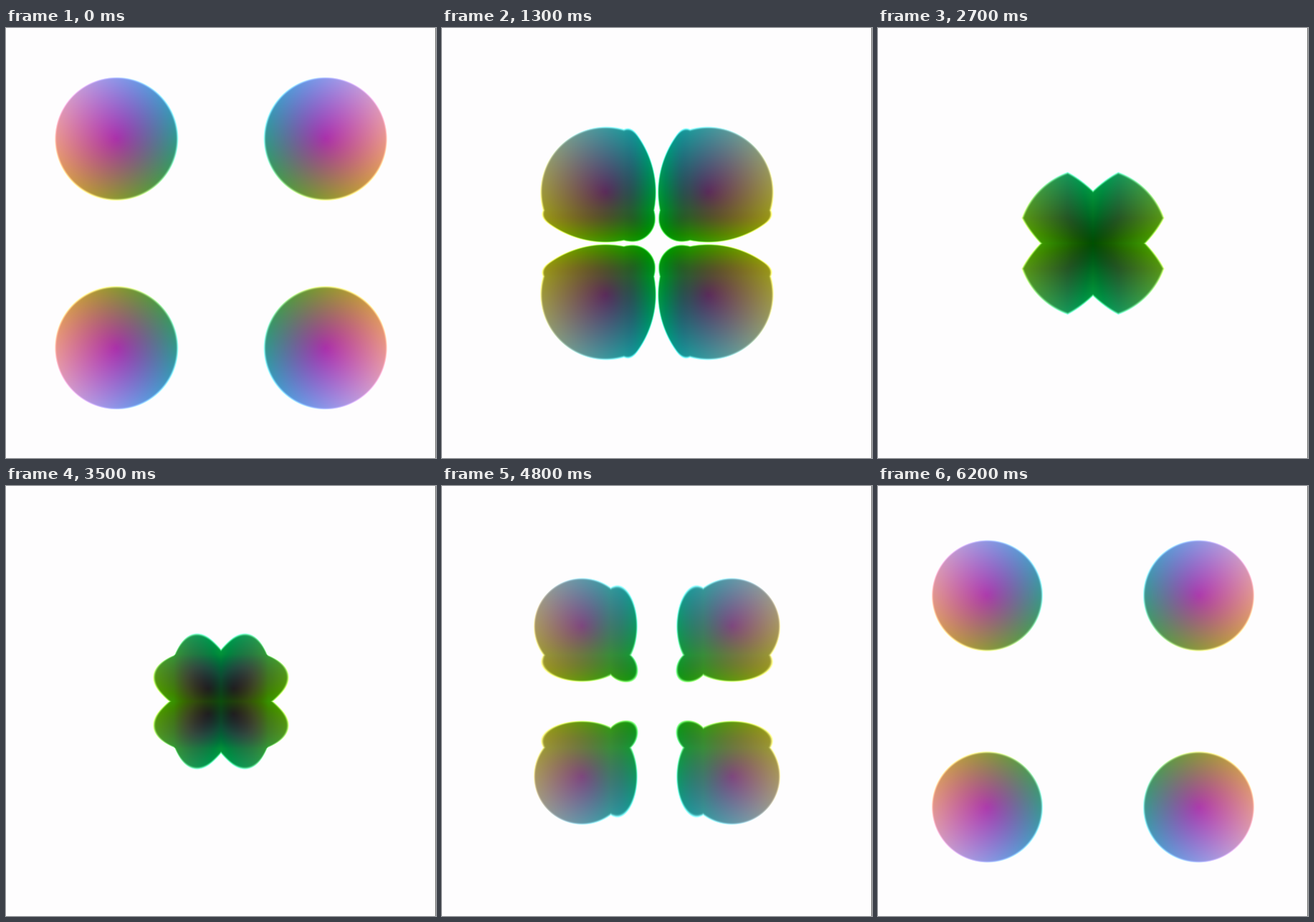
Recreate the animation shown at these times as an HTML page with a canvas. Size 600x600 px, loop 6300 ms.

```html
<!DOCTYPE html>
<html lang="en">
<head>
<meta charset="utf-8">
<title>Pulsing orbs</title>
<style>
  html, body { margin: 0; width: 100%; height: 100%; overflow: hidden; background: #fefdfe; }
  canvas { display: block; width: 100vw; height: 100vh; }
</style>
</head>
<body>
<canvas id="stage" width="600" height="600"></canvas>
<script>
const SIZE = 600, STEP = 100, STEPS = 63;
const CX = 299.5, CY = 300;
const BAND = 35.5; // half width of the creases along both axes

const ctx = document.getElementById('stage').getContext('2d');
const image = ctx.createImageData(SIZE, SIZE);
const data = image.data;

// max(0, x) with its corner rounded over a width of 2w
function softRamp(x, w) {
  if (x <= -w) return 0;
  return x < w ? (x + w) ** 2 / (4 * w) : x;
}

function render(t) {
  const offset = 75.5 + 74.5 * Math.cos(t + 0.32);
  const radius = 85.8 + 21 * Math.sin(5 * t);
  const slack = Math.max(0, 104 - radius);
  const reach = BAND + 0.78 * slack;
  const pull = 0.175 * Math.sqrt(slack);
  const soft = 0.6 * slack + 0.01;

  const crease = a => softRamp(BAND - a, soft);
  const bulge = a => {
    const depth = Math.max(0, reach - a);
    return pull * depth / (1 + depth / 40);
  };

  for (let y = 0, i = 0; y < SIZE; y++) {
    const v = Math.abs(y - CY);
    const creaseV = crease(v), bulgeV = bulge(v);
    for (let x = 0; x < SIZE; x++, i += 4) {
      const u = Math.abs(x - CX);
      const bulgeU = bulge(u);
      const d = Math.hypot(u - offset, v - offset)
        + Math.hypot(crease(u), creaseV)
        - bulgeU - bulgeV - bulgeU * bulgeV / 40;
      const rim = Math.min(1, Math.max(0, (d - radius + 3.2) / 5));
      const glow = 255 * rim * rim;
      const tint = 12 - 30 * Math.min(1, Math.max(0, d / radius));
      data[i] = Math.min(254, Math.max(0, 1.08 * u + tint) + glow);
      data[i + 1] = Math.min(253, Math.max(0, 152 - 1.2 * (radius - d)) + glow);
      data[i + 2] = Math.min(254, Math.max(0, 1.08 * v + tint) + glow);
      data[i + 3] = 255;
    }
  }
  ctx.putImageData(image, 0, 0);
  ctx.fillStyle = '#6b6b6b';
  ctx.fillRect(SIZE - 1, 0, 1, SIZE);
}

const start = performance.now();
let shown = -1;

function tick() {
  const step = Math.floor((performance.now() - start) / STEP) % STEPS;
  if (step !== shown) {
    shown = step;
    render(step / 10);
  }
  requestAnimationFrame(tick);
}
tick();
</script>
</body>
</html>
```
